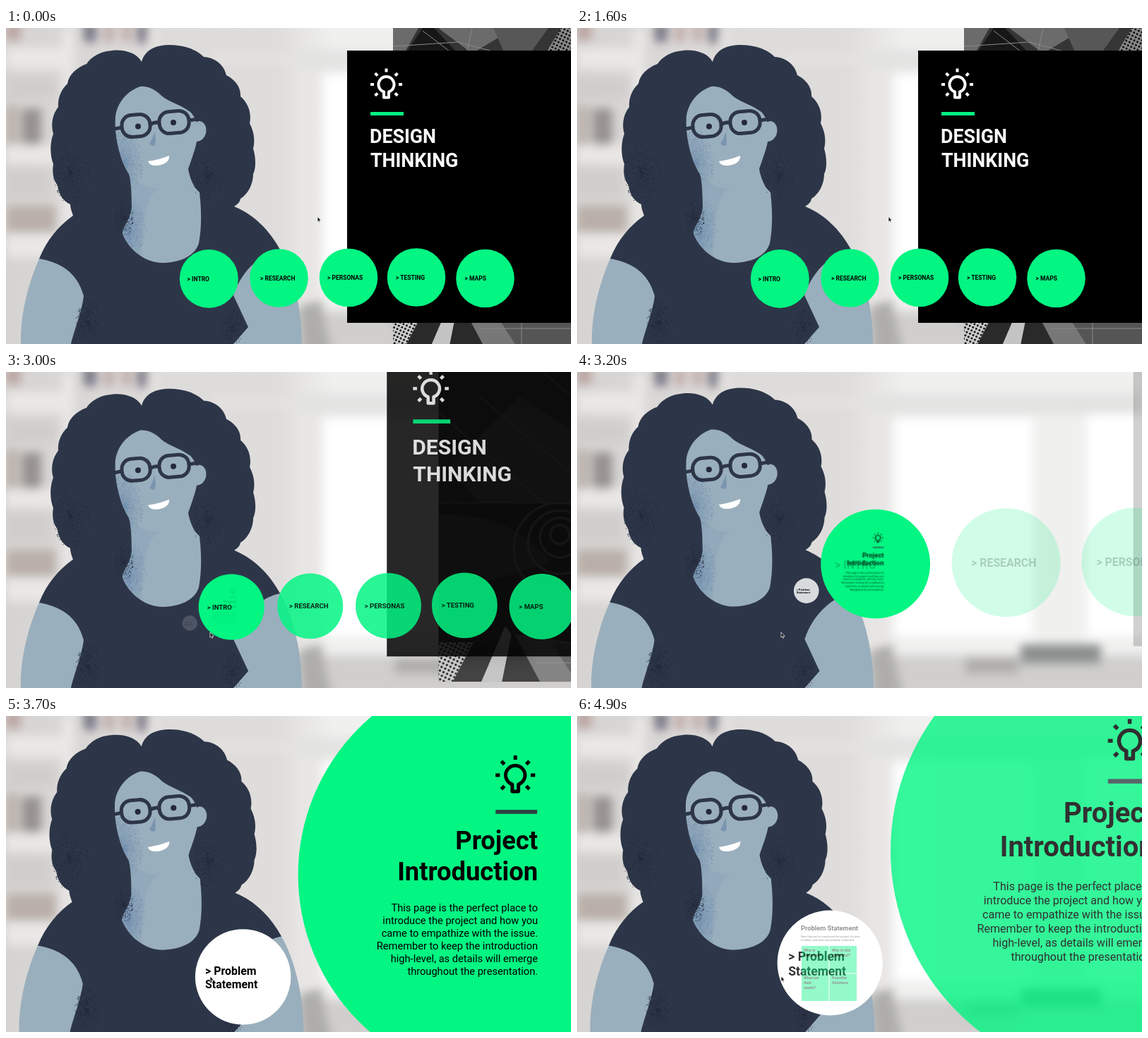
Write an HTML page that moves like this. It is 800x448 px and loops after 5 s.

```html
<!DOCTYPE html>
<html lang="en">
<head>
<meta charset="utf-8">
<title>Design Thinking</title>
<style>
  html, body { margin: 0; width: 100%; height: 100%; overflow: hidden; background: #dcdad8; }
  svg { display: block; width: 100vw; height: 100vh; }
  text { font-family: Roboto, "Open Sans", sans-serif; font-weight: 700; }
  #menu > * { opacity: var(--show, 1); }
  .icon { fill: none; stroke: currentColor; stroke-width: 4; }
  .dark { fill: #2d3648; }
  .skin { fill: #9aafbd; }
  .para { font-weight: 400; font-size: 14.9px; }
  .tiny { font-weight: 400; font-size: 4px; }
</style>
</head>
<body>
<svg viewBox="0 0 800 448" preserveAspectRatio="none">
  <defs>
    <filter id="blur" x="-30%" y="-30%" width="160%" height="160%"><feGaussianBlur stdDeviation="7"/></filter>
    <linearGradient id="wall">
      <stop offset="0" stop-color="#d6d4d2"/><stop offset=".3" stop-color="#dedcdb"/>
      <stop offset=".48" stop-color="#dfdddb"/><stop offset=".58" stop-color="#f0f0ef"/><stop offset="1" stop-color="#f0f0ef"/>
    </linearGradient>
    <radialGradient id="shade"><stop offset="0" stop-color="#6685a8" stop-opacity=".5"/><stop offset="1" stop-color="#6685a8" stop-opacity="0"/></radialGradient>
    <clipPath id="faceClip"><use href="#face"/></clipPath>
    <clipPath id="upper"><path d="M548 0h252v224H548z"/></clipPath>
    <clipPath id="lower"><path d="M548 224h252v226H548z"/></clipPath>
    <pattern id="dots" width="5" height="5" patternUnits="userSpaceOnUse" patternTransform="rotate(25)"><circle cx="2.5" cy="2.5" r="1.5"/></pattern>
    <g id="bulb" class="icon">
      <path d="M-3.5 18.5V10.5A11 11 0 1 1 3.5 10.5V18.5Z" stroke-linejoin="round"/>
      <g id="rays"></g>
    </g>
  </defs>

  <!-- blurred room -->
  <rect width="800" height="448" fill="url(#wall)"/>
  <g filter="url(#blur)">
    <path d="M0 28H92V58H0zM0 165H80V192H0zM0 292H90V325H0zM80 0H96V300H80z" fill="#eae8e6"/>
    <path d="M0 70H72V100H0zM0 200H62V240H0z" fill="#d0cecc"/>
    <path d="M22 114H50V166H22z" fill="#96928f"/>
    <path d="M0 110H16V166H0zM0 252H70V290H0z" fill="#b9afa8"/>
    <path d="M110 -8H128V20H110zM186 -8H200V22H186z" fill="#777582"/>
    <path d="M140 -8H152V20H140zM165 -8H176V20H165zM0 -8H20V18H0z" fill="#b9a39f"/>
    <path d="M205 0H215V30H205zM290 40H400V48H290z" fill="#e8e6e4"/>
    <path d="M412 30H800V60H412z" fill="#e3e3e2"/>
    <path d="M450 66H645V375H450zM722 60H820V375H722z" fill="#fff"/>
    <path d="M414 60H440V380H414z" fill="#e8e6e5"/>
    <path d="M380 402H820V460H380z" fill="#d0cfce"/>
    <path d="M415 395L445 385 462 460H420zM550 405H625V428H550z" fill="#aeadab"/>
    <path d="M628 386H742V414H628z" fill="#8b908f"/>
  </g>

  <!-- woman -->
  <g id="woman">
    <path class="dark" d="M192 48C197 30 213 24 232 24C253 24 270 31 280 41C297 42 309 53 312 67C324 73 333 84 332 97C343 106 348 121 345 135C351 147 353 158 350 171C354 184 354 199 350 207C350 222 342 236 332 242C331 247 328 250 323 253C350 264 372 285 388 314L343 448H92L47 327C58 300 75 280 95 266C93 260 91 255 91 250C82 246 74 236 73 223C67 215 65 205 67 193C62 180 62 163 67 150C63 137 66 122 74 112C73 100 78 87 87 79C89 66 100 56 114 51C121 40 135 33 150 32C168 30 186 36 192 48Z"/>
    <path class="skin" d="M47 327C30 365 20 410 21 448H92C96 430 108 400 110 380C101 345 75 332 47 327ZM388 314C365 318 335 340 322 379L343 424L322 448H419C420 400 406 345 388 314Z"/>
    <path id="face" class="skin" d="M190 83C172 89 158 105 155 125C153 150 160 185 174 207C177 215 178 235 178 255C175 275 165 281 165 292C176 318 200 333 222 333C252 332 269 320 273 305C278 280 276 250 274 233C265 225 260 212 258 200C263 185 268 172 270 161C280 160 285 150 283 141C281 132 272 130 270 134C268 128 264 122 261 119C246 108 227 104 217 93C209 86 199 82 190 83Z"/>
    <g clip-path="url(#faceClip)">
      <ellipse cx="168" cy="186" rx="24" ry="48" fill="url(#shade)" transform="rotate(-14 168 186)"/>
      <path d="M174 205C183 219 199 228 217 227C205 234 194 250 192 322L160 300L178 255Z" fill="#7f9ab5" opacity=".28"/>
      <ellipse cx="172" cy="285" rx="26" ry="52" fill="url(#shade)"/>
      <g id="skinSpecks" fill="#6f8cad"></g>
    </g>
    <path d="M211 147C211 154 213 162 211 166Q207 169 203 164C207 159 208 153 211 147Z" fill="#7a95b0"/>
    <path d="M201 189Q216 187 231 181C232 190 222 195 212 195Q203 195 201 189Z" fill="#fff"/>
    <g fill="none" stroke="#2d3648" stroke-width="5">
      <rect x="164" y="123" width="40" height="31" rx="14" transform="rotate(-5 184 138)"/>
      <rect x="217" y="118" width="42" height="31" rx="14" transform="rotate(-5 238 133)"/>
      <path d="M204 137Q211 132 218 135M259 131L272 129M154 143L164 141"/>
    </g>
    <g fill="#25293a"><circle cx="187" cy="139.5" r="4"/><circle cx="237" cy="134" r="4"/></g>
    <g id="darkSpecks" fill="#20283a"></g>
  </g>

  <!-- title slide -->
  <g id="menu">
    <g clip-path="url(#upper)">
      <path d="M548 0h252v224H548z" fill="#353535"/>
      <path d="M548 0H584L566 32H548ZM612 0L660 36 720 0Z" fill="#6b6b6b"/>
      <path d="M590 0L566 36H640L606 0Z" fill="#171717"/>
      <path d="M690 0H768L742 36H706ZM560 180L650 90 800 190V224H600Z" fill="#575757"/>
      <path d="M786 0H800V36H764Z" fill="#8a8a8a"/><path d="M786 0H800V36H764Z" fill="url(#dots)"/>
      <path d="M548 26L640 20 700 36M660 0L652 36M590 4L632 36M548 110L680 224M600 90L760 224M680 60L800 160" stroke="#8a8a8a" fill="none"/>
    </g>
    <g clip-path="url(#lower)">
      <path d="M548 224h252v226H548z" fill="#2a2a2a"/>
      <path d="M548 240C610 235 660 260 690 300L548 340Z" fill="#4a4a4a"/>
      <g fill="none" stroke="#777" stroke-width="3"><circle cx="701" cy="264" r="12"/><circle cx="701" cy="268" r="25"/><circle cx="701" cy="274" r="40"/><circle cx="701" cy="282" r="58"/></g>
      <path d="M548 400H592L566 450H548Z" fill="#d0d0d0"/><path d="M548 400H592L566 450H548Z" fill="url(#dots)"/>
      <path d="M632 380L602 450H628L640 390Z" fill="#c4c4c4"/>
      <path d="M644 390L676 450H800V412Z" fill="#777"/>
      <path d="M690 400L722 450H800V412Z" fill="#555"/>
      <path d="M730 418V450M670 426H800" stroke="#8a8a8a"/>
    </g>
    <path d="M483 32H802V418H483z"/>
    <use href="#bulb" x="538.5" y="80" color="#fff"/>
    <path d="M516 119h47v5h-47z" fill="#03f582"/>
    <g font-size="26.8" fill="#fff"><text x="515" y="163">DESIGN</text><text x="516" y="197">THINKING</text></g>
  </g>

  <!-- project introduction -->
  <g id="intro">
    <g id="page">
      <circle cx="715" cy="224" r="300" fill="#03f582"/>
      <g id="body">
        <use href="#bulb" transform="translate(728.5 80) scale(1.27)" color="#000"/>
        <path d="M700 130h60v6h-60z" fill="#2d4244"/>
        <g font-size="37" text-anchor="end"><text x="761" y="187">Project</text><text x="761" y="232">Introduction</text></g>
        <g id="para" text-anchor="end"></g>
      </g>
    </g>
    <g id="problem">
      <circle cx="335.5" cy="371.5" r="69" fill="#fff"/>
      <g id="label" font-size="16.2"><text x="281" y="369">&gt; Problem</text><text x="281" y="388">Statement</text></g>
    </g>
  </g>
  <text id="introLabel" x="256.5" y="359" font-size="8.5">&gt; INTRO</text>

  <!-- problem statement -->
  <g id="grid">
    <text x="317" y="304" font-size="9.3">Problem Statement</text>
    <text class="tiny" x="317" y="314">Now that you've introduced the project, it's time</text>
    <text class="tiny" x="317" y="319">to define and share the problem statement.</text>
    <path d="M318 326h38.5v38.5h-38.5zM357.5 326h38.5v38.5h-38.5zM318 365.5h38.5v38.5h-38.5zM357.5 365.5h38.5v38.5h-38.5z" fill="#03f582"/>
    <g font-size="5.4">
      <text x="321" y="334">Who is</text><text x="321" y="341">impacted?</text>
      <text x="361" y="334">Why is this</text><text x="361" y="341">impactful?</text>
      <text x="321" y="373">What are</text><text x="321" y="380">their</text><text x="321" y="387">needs?</text>
      <text x="361" y="373">Possible</text><text x="361" y="380">Solutions</text>
    </g>
  </g>

  <g id="cursor" stroke="#fff" stroke-width=".7" stroke-linejoin="round">
    <path id="arrow" d="M0 0V7.4L1.7 5.8 2.8 8.4 4 7.9 2.9 5.4H5.2Z" fill="#111"/>
    <path id="hand" d="M-.6 5V.8Q.3 -.4 1 .8V3.2L4 3.8Q4.8 4 4.6 5L4 8H.4L-2 5.2Q-1.6 4 -.6 5Z" fill="#fff" stroke="#222"/>
  </g>
</svg>
<script>
const $ = id => document.getElementById(id);
const NS = "http://www.w3.org/2000/svg";

function add(parent, tag, attrs, content = "") {
  const el = document.createElementNS(NS, tag);
  for (const key in attrs) el.setAttribute(key, attrs[key]);
  el.textContent = content;
  $(parent).append(el);
}

for (let i = 0; i < 8; i++)
  if (i !== 4) add("rays", "path", { d: "M0 -22.5V-17.5", transform: `rotate(${i * 45})` });

// grainy shading: dots scattered in an ellipse, denser in the middle
let seed = 7;
const random = () => (seed = seed * 16807 % 2147483647) / 2147483647;
function specks(id, cx, cy, rx, ry, count) {
  let d = "";
  for (let i = 0; i < count; i++) {
    const r = random(), a = random() * 2 * Math.PI;
    d += `M${(cx + rx * r * Math.cos(a)).toFixed(1)} ${(cy + ry * r * Math.sin(a)).toFixed(1)}h1v1h-1z`;
  }
  add(id, "path", { d });
}
specks("skinSpecks", 168, 190, 26, 48, 500);
specks("skinSpecks", 174, 290, 24, 48, 500);
specks("darkSpecks", 92, 205, 26, 44, 500);
specks("darkSpecks", 166, 270, 14, 26, 250);
specks("darkSpecks", 285, 210, 22, 36, 350);
specks("darkSpecks", 116, 418, 18, 32, 400);
specks("darkSpecks", 320, 424, 16, 26, 250);

const buttons = [
  ["RESEARCH", 386.5, 354.5, 360], ["PERSONAS", 485, 354, 455],
  ["TESTING", 581, 353.5, 552], ["MAPS", 678.5, 355, 649.5]
];
for (const [name, cx, cy, x] of buttons) {
  add("menu", "circle", { cx, cy, r: 41.3, fill: "#03f582" });
  add("menu", "text", { x, y: cy + 3, "font-size": 8.5 }, "> " + name);
}

["This page is the perfect place to", "introduce the project and how you", "came to empathize with the issue.",
 "Remember to keep the introduction", "high-level, as details will emerge", "throughout the presentation."]
  .forEach((line, i) => add("para", "text", { class: "para", x: 761, y: 276.5 + 18.4 * i }, line));

const LOOP = 5000, STEP = 100, K0 = 0.1383;
const START = { x: 287.3, y: 355.5 }, END = { x: 715, y: 224 };

const clamp = v => Math.min(1, Math.max(0, v));
const ease = (t, from, length) => (1 - Math.cos(Math.PI * clamp((t - from) / length))) / 2;
const mix = (a, b, p) => a + (b - a) * p;
const bend = (p, a, b) => p + p * (1 - p) * (a + b * p);
const show = (id, opacity) => $(id).setAttribute("opacity", opacity);
// scale around a local point and put that point at (x, y)
const place = (id, x, y, scale, from) =>
  $(id).setAttribute("transform", `translate(${x - scale * from.x} ${y - scale * from.y}) scale(${scale})`);

function draw(now) {
  const t = Math.floor(now % LOOP / STEP) * STEP;

  const zoom = ease(t, 2860, 896);
  const next = clamp((t - 4800) / 100);
  const k = K0 ** (1 - zoom) * (1 + 0.08 * next);
  const x = mix(START.x, END.x, bend(zoom, 0.347, -1.083)) + 53 * next;
  const y = mix(START.y, END.y, bend(zoom, 2.13, -2.07)) - 33.3 * next;
  place("menu", x, y, k / K0, START);
  place("introLabel", x, y, k / K0, START);
  place("intro", x, y, k, END);

  const fade = clamp(zoom * 2.6);
  $("menu").style.setProperty("--show", 1 - fade);
  $("menu").style.display = fade < 1 ? "" : "none";
  show("introLabel", 1 - fade);
  show("body", fade);
  show("problem", fade);
  show("page", 1 - 0.2 * next);
  show("label", 1 - 0.2 * next);
  show("grid", 0.42 * next);

  const pivot = { x: 215, y: 448 };
  place("woman", pivot.x, pivot.y, 1 + 0.012 * zoom, pivot);

  const move = ease(t, 1650, 650);
  $("cursor").setAttribute("transform", `translate(${mix(441, 289, move)} ${mix(267.5, 369, move)})`);
  const hand = t >= 2200 && t < 2900;
  show("arrow", hand ? 0 : 1);
  show("hand", hand ? 1 : 0);
}

let begin;
function tick(now) {
  begin ??= now;
  draw(now - begin);
  requestAnimationFrame(tick);
}
draw(0);
requestAnimationFrame(tick);
</script>
</body>
</html>
```
